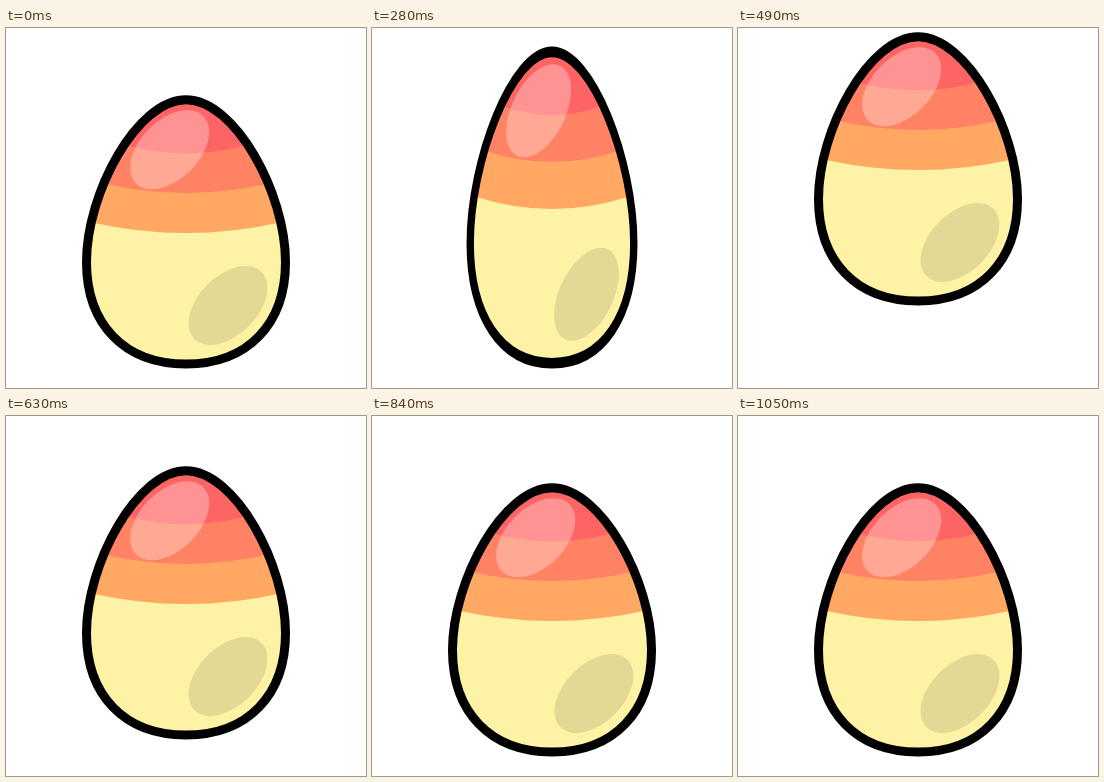
Animation of 360x360 px, one loop 1120 ms. Source, as an HTML page:

```html
<!DOCTYPE html>
<html lang="en">
<head>
<meta charset="utf-8">
<title>Bouncing egg</title>
<style>
html, body { margin: 0; width: 100%; height: 100%; overflow: hidden; background: #fff; }
svg { display: block; width: 100vw; height: 100vh; }
</style>
</head>
<body>
<svg viewBox="0 0 360 360">
  <defs>
    <path id="shell" d="M180 71.7C229 71.7 279.5 165 279.5 234C279.5 296 242 336 180 336S80.5 296 80.5 234C80.5 165 131 71.700 180 71.7Z"/>
    <clipPath id="inside"><use href="#shell"/></clipPath>
  </defs>
  <g id="egg">
    <g clip-path="url(#inside)">
      <path fill="#fef2a5" d="M60 60H300V350H60Z"/>
      <path fill="#ffa864" d="M86 60V194.4Q180 215.6 274 194.4V60Z"/>
      <path fill="#ff8264" d="M98 60V155.6Q180 174.4 262 155.6V60Z"/>
      <path fill="#ff6464" d="M120 60V117.6Q180 132.8 240 117.6V60Z"/>
      <ellipse rx="47.5" ry="29.4" transform="translate(163.7 121.8) rotate(-45)" fill="#fff" fill-opacity=".3"/>
      <ellipse rx="47.5" ry="29.4" transform="translate(222 277.5) rotate(-45)" fill-opacity=".1"/>
    </g>
    <use href="#shell" fill="none" stroke="#000" stroke-width="9"/>
  </g>
</svg>
<script>
const LOOP = 1120, STEP = 70, FLOOR = 340.5;
const egg = document.getElementById('egg');

// [time, squash]: positive is wide and low, negative is thin and tall
const squashKeys = [[0, 0], [140, .145], [280, -.178], [420, 0], [670, 0],
  [770, .13], [840, 0], [910, -.06], [1050, 0], [LOOP, 0]];

function squashAt(t) {
  const i = squashKeys.findIndex(key => key[0] > t);
  const [t0, a] = squashKeys[i - 1], [t1, b] = squashKeys[i];
  return a + (b - a) * (1 - Math.cos(Math.PI * (t - t0) / (t1 - t0))) / 2;
}

// Eased take-off to the top, then free fall to the floor
function liftAt(t) {
  const start = 280, top = 399, height = 71.45;
  if (t < start) return 0;
  if (t < top) return -height * Math.sin(Math.PI / 2 * (t - start) / (top - start));
  return Math.min(0, -height + 5 * ((t - top) / STEP) ** 2);
}

function draw(now) {
  const t = Math.floor(now % LOOP / STEP) * STEP;
  const s = squashAt(t);
  egg.setAttribute('transform',
    `translate(180 ${FLOOR + liftAt(t)}) scale(${1 + s} ${1 - s}) translate(-180 ${-FLOOR})`);
  requestAnimationFrame(draw);
}
draw(performance.now());
</script>
</body>
</html>
```
